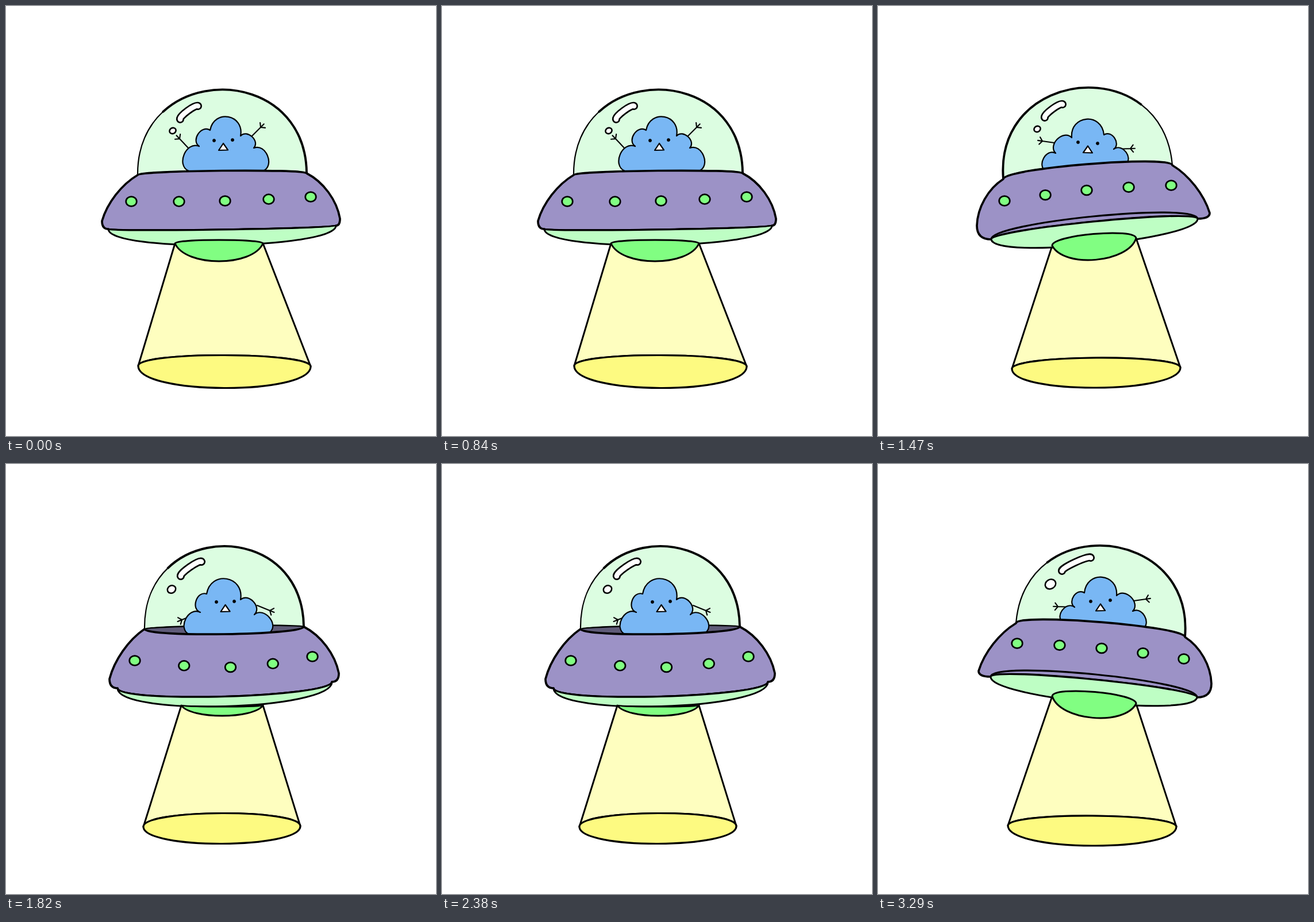
An HTML page that plays this animation: 748 by 748 pixels, repeating every 3360 ms.

```html
<!DOCTYPE html>
<html lang="en">
<head>
<meta charset="utf-8">
<title>Wobbling saucer</title>
<style>
  html, body { margin: 0; width: 100%; height: 100%; overflow: hidden; background: #fff; }
  svg { display: block; width: 100vw; height: 100vh; }
  path, ellipse { stroke: #000; stroke-linecap: round; stroke-linejoin: round; }
</style>
</head>
<body>
<svg id="stage" viewBox="0 0 748 748"></svg>
<script>
const STEP = 70;
const MIRROR = 752;
const C = {
  glass: '#dcfde1', cloud: '#79b7f4', body: '#9c92c6', hull: '#befec4',
  green: '#81fe82', beam: '#fefebf', disc: '#fdfa81', inside: '#5f5b78'
};

// Key points of each lean: left and right ends, then heights above and below.
const back = {
  deck: [[229, 294], [523, 291]], dome: 147, rise: 6,
  flank: [[167, 374], [581, 370]],
  hull: [[178, 388], [574, 382]], lift: -4, depth: 31,
  lens: [[294, 413], [447, 413]], lensUp: 6, lensDown: 31,
  disc: [[230, 626], [530, 627]], discUp: 19, discDown: 38,
  lights: [[218, 340], [530, 332]], shift: [7, 3],
  cloud: [[318, 287], [336, 244], [355, 216], [408, 226], [431, 247], [447, 287]],
  eyes: [[362, 234], [394, 233]],
  arms: [[[319, 249], [302, 231]], [[428, 226], [443, 211]]],
  shine: [[303, 197], [334, 174]], dot: [290, 217, 5.8]
};
const front = {
  deck: [[241, 287], [518, 283]], dome: 142, rise: -11,
  flank: [[180, 374], [579, 364]],
  hull: [[194, 390], [567, 379]], lift: -20, depth: 37,
  lens: [[305, 420], [447, 420]], lensUp: -2, lensDown: 18,
  disc: [[239, 631], [512, 630]], discUp: 23, discDown: 30,
  lights: [[224, 342], [533, 335]], shift: [12, 15],
  cloud: [[318, 296], [338, 258], [349, 226], [408, 236], [432, 262], [459, 293]],
  eyes: [[366, 240], [397, 239]],
  arms: [[[338, 258], [306, 271]], [[437, 246], [459, 255]]],
  shine: [[304, 195], [340, 170]], dot: [288, 218, 7.5]
};
const right = {
  deck: [[240, 277], [534, 301]], dome: 147, rise: 14,
  flank: [[175, 360], [580, 382]],
  hull: [[196, 370], [555, 406]], lift: 13, depth: 27,
  lens: [[303, 404], [449, 417]], lensUp: 14, lensDown: 31,
  disc: [[226, 629], [519, 631]], discUp: 18, discDown: 34,
  lights: [[242, 312], [532, 339]], shift: [2, -5],
  cloud: [[321, 275], [342, 249], [359, 224], [415, 229], [443, 256], [460, 287]],
  eyes: [[370, 239], [404, 237]],
  arms: [[[338, 249], [313, 248]], [[445, 238], [466, 235]]],
  shine: [[320, 186], [370, 163]], dot: [300, 209, 9.5]
};

// Arch from a to b, h high on its left side; inset pulls it towards a point.
function bow(a, b, h, inset = 0) {
  const dx = b[0] - a[0], dy = b[1] - a[1];
  const m = h * 4 / 3 / Math.hypot(dx, dy);
  const at = t => [a[0] + dx * t + dy * m, a[1] + dy * t - dx * m];
  return `C${at(inset)} ${at(1 - inset)} ${b}`;
}
const path = (d, fill, width, more = '') =>
  `<path d="${d}" fill="${fill}" stroke-width="${width}" ${more}/>`;
const oval = (x, y, rx, ry, fill, width, turn = 0) =>
  `<ellipse cx="${x}" cy="${y}" rx="${rx}" ry="${ry}" fill="${fill}" stroke-width="${width}" transform="rotate(${turn} ${x} ${y})"/>`;
const arch = ([a, b], h) => `M${a}` + bow(a, b, h);
const slice = ([a, b], up, down, inset) => arch([a, b], up) + bow(b, a, down, inset) + 'Z';

function beam(p) {
  const [a, b] = p.disc;
  return path(`M${p.lens[0]}L${a}${bow(a, b, p.discUp)}L${p.lens[1]}`, C.beam, 3)
    + path(slice(p.disc, p.discUp, p.discDown), C.disc, 3.2);
}

function dome(p) {
  const d = arch(p.deck, p.dome);
  return path(d, C.glass, 2.2)
    + path(d, 'none', 3.9, 'pathLength="100" style="stroke-dasharray:0 26 74 100;stroke-linecap:butt"')
    + path(slice(p.deck, 4, -p.rise), C.inside, 2.6);
}

function body(p) {
  const [tl, tr] = p.deck, [fl, fr] = p.flank, [hl, hr] = p.hull;
  const d = arch(p.deck, p.rise) + bow(tr, fr, 11, .3) + `Q${fr[0]} ${hr[1]} ${hr}`
    + bow(hr, hl, -p.lift) + `Q${fl[0]} ${hl[1]} ${fl}` + bow(fl, tl, 9, .3) + 'Z';
  return path(d, C.body, 3.7)
    + path(arch(p.hull, p.lift + .7 * Math.max(0, p.lift)), 'none', 3.2)
    + path(slice(p.hull, p.lift, p.depth), C.hull, 3)
    + path(slice(p.lens, p.lensUp, p.lensDown, .12), C.green, 3);
}

function lights({ lights: [a, b], shift }) {
  let out = '';
  for (let t = 0; t <= 1; t += .25) {
    const [x, y] = [0, 1].map(k => a[k] + (b[k] - a[k]) * t + shift[k] * Math.sin(Math.PI * t));
    out += oval(x, y, 9.3, 8.4, C.green, 2.7);
  }
  return out;
}

function arm([a, b]) {
  const turn = Math.atan2(b[1] - a[1], b[0] - a[0]);
  const fingers = [-.9, 0, .9].map(s =>
    `M${b}l${8 * Math.cos(turn + s)} ${8 * Math.sin(turn + s)}`);
  return path(`M${a}L${b}` + fingers.join(''), 'none', 2.1);
}

function cloud(p) {
  let d = `M${p.cloud[0]}`;
  p.cloud.slice(1).forEach((b, i) => {
    const a = p.cloud[i];
    d += bow(a, b, Math.hypot(b[0] - a[0], b[1] - a[1]) * (i === 2 ? .53 : .4));
  });
  const [[lx, ly], [rx, ry]] = p.eyes;
  return p.arms.map(arm).join('') + path(d, C.cloud, 2.2)
    + p.eyes.map(([x, y]) => oval(x, y, 2.6, 2.8, '#000', .5)).join('')
    + path(`M${(lx + rx) / 2} ${(ly + ry) / 2 + 5.5}l8 11.5l-16 .5Z`, '#fff', 2.2);
}

function shine({ shine: s, dot: [x, y, r] }) {
  const d = arch(s, 4);
  return path(d, 'none', 14) + path(d, 'none', 8.6, 'style="stroke:#fff"')
    + oval(x, y, r, r * .85, '#fff', 2.6, -30);
}

const ship = p => beam(p) + dome(p) + cloud(p) + body(p) + lights(p);

// The left lean mirrors the right one, with the reflection kept on the left.
const leftLean = `<g transform="matrix(-1 0 0 1 ${MIRROR} 0)">${ship(right)}</g>`
  + `<g transform="translate(-13 -3)">${shine(back)}</g>`;
const poses = [ship(back) + shine(back), leftLean, ship(front) + shine(front), ship(right) + shine(right)];

const stage = document.getElementById('stage');
stage.innerHTML = poses.map(p => `<g visibility="hidden">${p}</g>`).join('');
const groups = [...stage.children];

const start = performance.now();
function tick() {
  const k = Math.floor((performance.now() - start) / STEP) % groups.length;
  groups.forEach((g, i) => g.setAttribute('visibility', i === k ? 'visible' : 'hidden'));
  requestAnimationFrame(tick);
}
tick();
</script>
</body>
</html>
```
